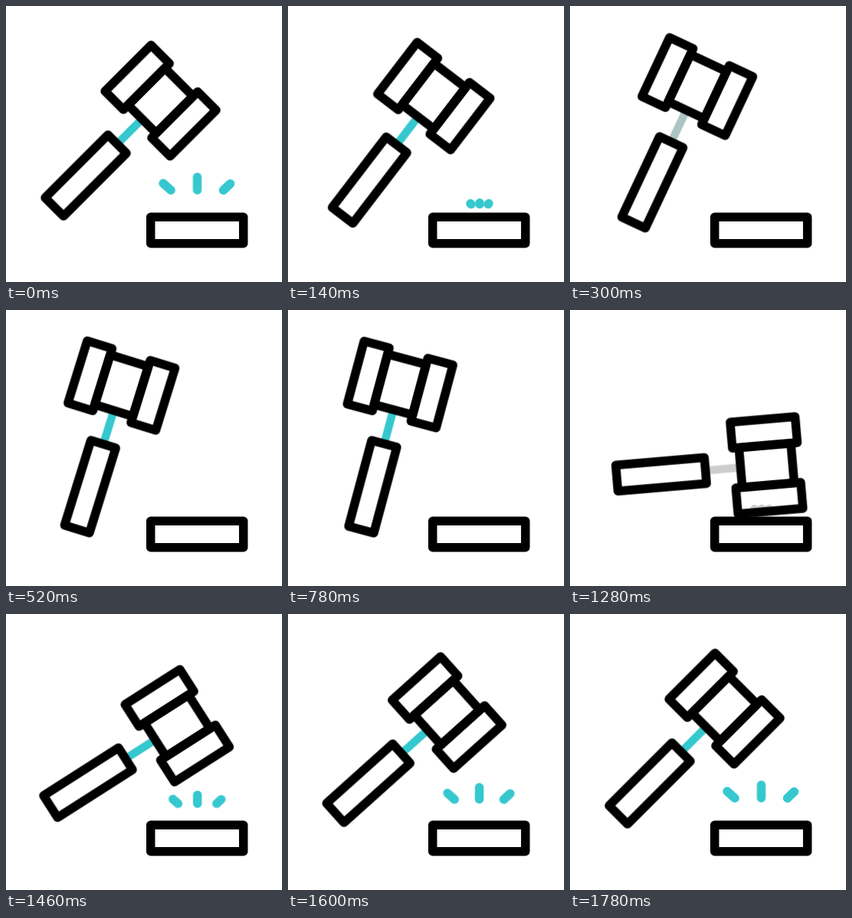
Write an HTML page that moves like this. It is 360x360 px and loops after 1800 ms.

```html
<!DOCTYPE html>
<html lang="en">
<head>
<meta charset="utf-8">
<title>Gavel</title>
<style>
  :root {
    --teal: #35c8ce;
    --grey: #cdcdcd;
    --out: cubic-bezier(.333, .98, .667, 1);
    --soft: cubic-bezier(.333, .867, .667, 1);
    --loop: 1800ms linear infinite;
  }
  html, body { margin: 0; width: 100%; height: 100%; overflow: hidden; background: #fff; }
  svg { display: block; width: 100%; height: 100%; }
  svg * { fill: none; stroke-width: 11.5; stroke-linecap: round; stroke-linejoin: round; }
  rect { stroke: #000; }

  .move { animation: move var(--loop); }
  .turn { animation: turn var(--loop); }
  .shaft { stroke-width: 10.5; stroke-linecap: butt; animation: tint var(--loop); }
  .spark { vector-effect: non-scaling-stroke; animation: burst var(--loop), glow var(--loop); }

  /* centre of the handle */
  @keyframes move {
    0% { transform: translate(104px, 221px); animation-timing-function: cubic-bezier(.33, .6, .67, .95); }
    16.667% { transform: translate(107.5px, 230px); animation-timing-function: var(--soft); }
    43.333%, 56.667% { transform: translate(110.5px, 230.5px); }
    61.111% { transform: translate(109px, 228.5px); animation-timing-function: cubic-bezier(.4, .2, .7, .8); }
    67.778% { transform: translate(130px, 205px); animation-timing-function: cubic-bezier(.33, .45, .67, .8); }
    71.111% { transform: translate(119px, 214.3px); animation-timing-function: cubic-bezier(.33, .6, .67, .9); }
    81.111% { transform: translate(107px, 220px); animation-timing-function: var(--soft); }
    98.889%, 100% { transform: translate(104px, 221px); }
  }
  /* raise, strike, rebound */
  @keyframes turn {
    0% { transform: rotate(-45deg); animation-timing-function: var(--soft); }
    43.333% { transform: rotate(-75deg); }
    56.667% { transform: rotate(-75deg); animation-timing-function: cubic-bezier(.333, .5, .667, .75); }
    67.778% { transform: rotate(0deg); animation-timing-function: var(--out); }
    98.889%, 100% { transform: rotate(-45deg); }
  }
  @keyframes tint {
    0%, 8%, 25%, 65%, 77%, 100% { stroke: var(--teal); }
    16.667% { stroke: #adc4c4; }
    70%, 72% { stroke: var(--grey); }
  }
  @keyframes burst {
    0% { transform: none; opacity: 1; animation-timing-function: var(--soft); }
    12% { transform: translate(var(--x), var(--y)) scale(.02); opacity: 1; }
    12.01%, 70.55% { transform: translate(var(--x), var(--y)) scale(.02); opacity: 0; }
    70.556% { transform: translate(var(--x), var(--y)) scale(.02); opacity: 1; animation-timing-function: var(--out); }
    98.889%, 100% { transform: none; opacity: 1; }
  }
  @keyframes glow {
    0%, 65%, 77%, 100% { stroke: var(--teal); }
    70%, 72% { stroke: var(--grey); }
  }
</style>
</head>
<body>
<svg viewBox="0 0 360 360">
  <g transform="translate(210 235.7)">
    <path class="spark" style="--x:31px;--y:24.5px" d="M-5-4.5 5 4.5"/>
  </g>
  <g transform="translate(249.5 231.5)">
    <path class="spark" style="--x:.5px;--y:28.5px" d="M0-8.5V8.5"/>
  </g>
  <g transform="translate(288 236)">
    <path class="spark" style="--x:-29px;--y:24px" d="M4.5-4.2-4.5 4.2"/>
  </g>
  <rect x="188.7" y="275.2" width="121" height="34.5"/>
  <g class="move">
    <g class="turn">
      <path class="shaft" d="M58 0H104"/>
      <rect x="-58" y="-17" width="116" height="34"/>
      <rect x="104" y="-26" width="68" height="52"/>
      <rect x="95.5" y="-60" width="85" height="34"/>
      <rect x="95.5" y="26" width="85" height="34"/>
    </g>
  </g>
</svg>
<script>
  // Tie every keyframe animation to the page clock.
  const parts = document.getAnimations();
  parts.forEach(part => part.pause());

  function tick() {
    const now = performance.now();
    parts.forEach(part => { part.currentTime = now; });
    requestAnimationFrame(tick);
  }
  tick();
</script>
</body>
</html>
```
